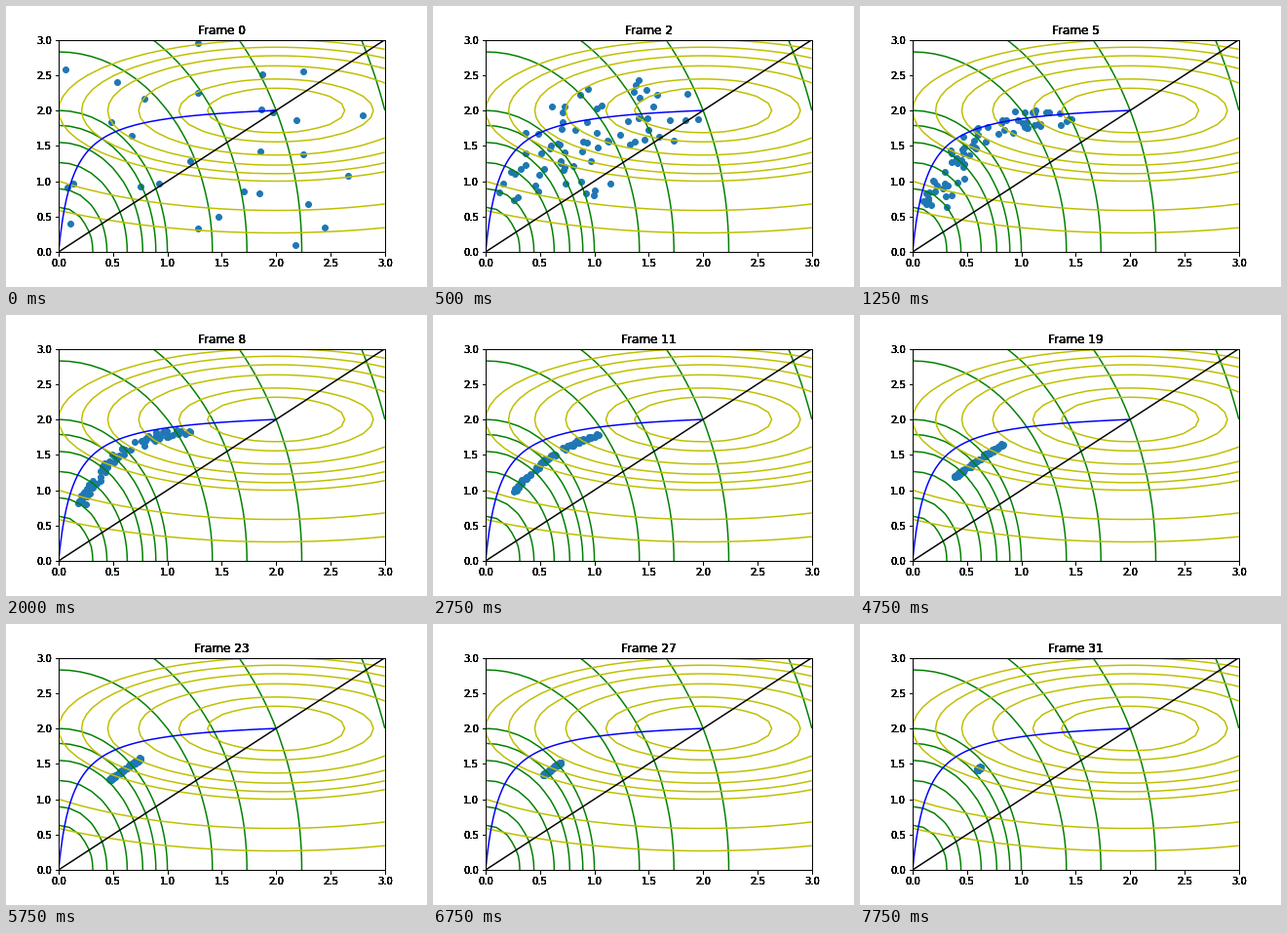
Recreate the animation shown at these times as a matplotlib script. Size 432 px wide and 288 px high, loop 8000 ms.

```python
import numpy as np
import matplotlib.pyplot as plt
from matplotlib.animation import FuncAnimation

FRAMES, INTERVAL = 32, 250
rng = np.random.default_rng(8)

# Place of each member along the band, in three clusters
S = np.concatenate([np.linspace(0, .22, 22), np.linspace(.28, .53, 22),
                    np.linspace(.64, 1, 28)])
START = rng.uniform(0, 5, (len(S), 2))
JITTER = rng.uniform(-1, 1, (len(S), 2)) * (.015, .02)

# Shape of the band: generation, lower end x, y, upper end x, y, bow
BAND = np.array([
    [5, .04, .50, 1.31, 1.86, .39],
    [11, .25, .97, 1.04, 1.78, .10],
    [15, .29, 1.09, .91, 1.71, .02],
    [23, .465, 1.27, .76, 1.58, 0],
    [31, .595, 1.41, .625, 1.45, 0]])


def band(g):
    x0, y0, x1, y1, bow = (np.interp(g, BAND[:, 0], c) for c in BAND.T[1:])
    bulge = bow * 4 * S * (1 - S)
    line = np.column_stack([x0 + (x1 - x0) * S - .43 * bulge,
                            y0 + (y1 - y0) * S + bulge])
    return line + JITTER * np.interp(g, [11, 31], [1, .5])


def members(g):
    """The scattered start falls quickly onto the band, which then shrinks."""
    scatter = max(0, 1 - g / 12) * (1 + g) ** -1.3
    goal = band(g)
    return goal + scatter * (START - goal)


fig = plt.figure(figsize=(6, 4), dpi=72)
fig.subplots_adjust(left=.125, right=.9, bottom=.125, top=.88)
ax = fig.add_subplot()
# Stacked transparent axes give the heavy look of the lettering.
layers = [ax] + [fig.add_axes(ax.get_position(), facecolor="none")
                 for _ in range(7)]
for layer in layers:
    layer.set(xlim=(0, 3), ylim=(0, 3))

grid = np.linspace(0, 3, 31)
X, Y = np.meshgrid(grid, grid)
levels = [.1, .2, .4, .6, .8, 1, 2, 3, 5, 10]
ax.contour(X, Y, X**2 + Y**2 / 4, levels, colors="g")
ax.contour(X, Y, (X - 2)**2 / 4 + (Y - 2)**2, levels[:-1], colors="y")

x = np.linspace(0, 2, 200)
ax.plot(x, 16 * x / (1 + 7.5 * x), "b")
ax.plot([0, 3], [0, 3], "k")
dots = ax.scatter([], [], zorder=1)
titles = [layer.set_title("") for layer in layers]


def update(g):
    dots.set_offsets(members(g))
    for title in titles:
        title.set_text(f"Frame {g}")
    return [dots, *titles]


anim = FuncAnimation(fig, update, frames=FRAMES, interval=INTERVAL,
                     init_func=lambda: update(0), repeat=True, repeat_delay=0)
plt.show()
```
